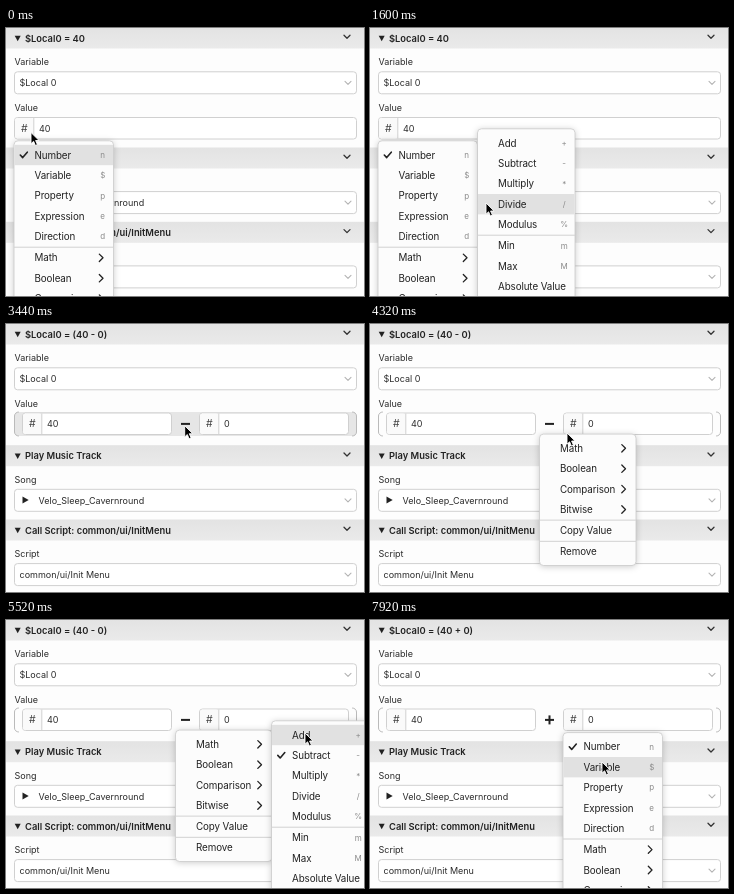
Recreate the animation shown at these times as an HTML page. Size 358 by 268 pixels, loop 8 s.

```html
<!DOCTYPE html>
<html lang="en">
<head>
<meta charset="utf-8">
<style>
  html, body { margin: 0; height: 100%; overflow: hidden; background: #fdfdfd; }
  svg { display: block; }
  text { font: 9px Inter, sans-serif; fill: #2b2b2b; white-space: pre; }
  .title { font-size: 9.35px; font-weight: 600; fill: #222; }
  .item { font-size: 9.8px; letter-spacing: -.1px; fill: #222; }
  .hint { font-size: 8px; fill: #8a8a8a; text-anchor: middle; }
  .hash { font-size: 10.5px; text-anchor: middle; fill: #444; }
  .line { fill: none; stroke-linecap: round; stroke-linejoin: round; }
  .menu { filter: drop-shadow(0 1px 3px #0003); }
</style>
</head>
<body>
<svg id="stage" width="358" height="268" viewBox="0 0 358 268"></svg>
<script>
const stage = document.getElementById('stage');
const LOOP = 8000, STEP = 80, ROW = 20.4, PAD = 4, GAP = 0.8;
const INK = '#222', BORDER = '#d0d0d0';

// Pointer stops: time, x, y
const stops = [
  [240, 25, 104.5], [880, 50, 226], [1360, 50, 226], [1600, 116, 175],
  [2080, 166, 132], [2640, 166, 132], [3520, 179, 101], [4080, 179, 101],
  [4320, 197, 109], [4560, 215, 122], [4800, 215, 122], [5520, 299, 113],
  [6000, 299, 113], [6720, 207, 107], [6800, 207, 107], [7040, 206, 105],
  [7440, 206, 105], [7920, 232, 142]
];

const valueItems = ['Number|n', 'Variable|$', 'Property|p', 'Expression|e', 'Direction|d', '-',
  'Math|>', 'Boolean|>', 'Comparison|>', 'Bitwise|>'];
const mathItems = ['Add|+', 'Subtract|-', 'Multiply|*', 'Divide|/', 'Modulus|%', '-',
  'Min|m', 'Max|M', 'Absolute Value|'];
const operatorItems = ['Math|>', 'Boolean|>', 'Comparison|>', 'Bitwise|>', '-',
  'Copy Value|', '-', 'Remove|'];

const menus = [
  { from: 0, to: 2400, x: 7.5, y: 112.8, w: 100.5, items: valueItems, checked: 0, focus: 0 },
  { from: 1040, to: 2400, x: 107, y: 100.8, w: 98.5, items: mathItems, checked: -1, focus: 0 },
  { from: 3680, to: 5840, x: 169, y: 110.1, w: 97.5, items: operatorItems, checked: -1, focus: -1 },
  { from: 4720, to: 5840, x: 265, y: 100.8, w: 98.5, items: mathItems, checked: 1, focus: 0 },
  { from: 7280, to: LOOP, x: 192.5, y: 112.6, w: 100.5, items: valueItems, checked: 0, focus: 0 }
];

for (const menu of menus) {
  let y = menu.y + PAD, index = 0;
  menu.rules = [];
  menu.rows = [];
  for (const item of menu.items) {
    if (item === '-') {
      menu.rules.push(y + GAP / 2);
      y += GAP;
    } else {
      const [label, hint] = item.split('|');
      menu.rows.push({ label, hint, y, index: index++ });
      y += ROW;
    }
  }
  menu.h = y + PAD - menu.y - .6;
}

function pointerAt(t) {
  const i = stops.findIndex(s => s[0] > t);
  if (i === 0) return stops[0].slice(1);
  if (i < 0) return stops[stops.length - 1].slice(1);
  const [t0, x0, y0] = stops[i - 1], [t1, x1, y1] = stops[i];
  const u = (t - t0) / (t1 - t0), k = u * u * (3 - 2 * u);
  return [x0 + (x1 - x0) * k, y0 + (y1 - y0) * k];
}

const text = (x, y, s, cls = '') => `<text x="${x}" y="${y}" class="${cls}">${s}</text>`;
const rect = (x, y, w, h, fill, extra = '') =>
  `<rect x="${x}" y="${y}" width="${w}" height="${h}" fill="${fill}" ${extra}/>`;
const line = (d, color, width) =>
  `<path class="line" d="${d}" stroke="${color}" stroke-width="${width}"/>`;
const box = (x, y, w, h) => rect(x, y, w, h, '#fff', `rx="3" stroke="${BORDER}"`);
const chevron = (x, y, color, width) => line(`M${x - 3} ${y - 1.5}l3 3 3-3`, color, width);

const headerFill = `<linearGradient id="bar" x2="0" y2="1">
  <stop stop-color="#e3e3e3"/><stop offset="1" stop-color="#eaeaea"/></linearGradient>`;

const header = (y, title) =>
  rect(0, y - 10.5, 358, 21, 'url(#bar)') +
  `<path d="M8.7 ${y - 2.2}h6l-3 5.4z" fill="${INK}"/>` +
  text(19, y + 3.7, title, 'title') + chevron(341, y - 1.2, '#333', 1.3);

const select = (y, x, value) =>
  box(8.5, y - 11, 342, 22) + text(x, y + 3.3, value) + chevron(342, y, '#b4b4b4', 1.1);

const numberField = (x, y, w, value) =>
  box(x, y, w, 21.5) +
  rect(x + .5, y + .5, 18.5, 20.5, '#fafafa', 'rx="2.5"') +
  rect(x + 18.8, y + .5, 1, 20.5, BORDER) +
  text(x + 9.9, y + 14.3, '#', 'hash') + text(x + 24.5, y + 14, value);

function valueGroup(plus, hover) {
  return (hover ? rect(8.5, 88, 342, 24, '#e6e6e6', 'rx="4"') : '') +
    line('M12.5 88a4 4 0 0 0-4 4v16a4 4 0 0 0 4 4', '#bababa', 1) +
    line('M346.5 88a4 4 0 0 1 4 4v16a4 4 0 0 1-4 4', '#bababa', 1) +
    numberField(16.5, 89, 149, '40') + numberField(193.5, 89, 149, '0') +
    rect(175, 98.9, 9, 2, INK) + (plus ? rect(178.5, 95.4, 2, 9, INK) : '');
}

function drawMenu(menu, active) {
  const { x, y, w, h } = menu;
  let out = rect(x + .5, y, w - 1, h, '#fcfcfc', 'rx="4" stroke="#cacaca" stroke-width=".8"');
  for (const row of menu.rows) {
    const mid = row.y + ROW / 2;
    if (row.index === active) out += rect(x + 1, row.y, w - 2, ROW, '#e1e1e1');
    if (row.index === menu.checked) out += line(`M${x + 6.8} ${mid}l2.4 2.6 4.6-5.4`, INK, 1.6);
    out += text(x + 21, mid + 3.5, row.label, 'item');
    out += row.hint === '>'
      ? line(`M${x + w - 14.7} ${mid - 3.7}l3.7 3.7-3.7 3.7`, INK, 1.3)
      : text(x + w - 11.3, mid + 2.8, row.hint, 'hint');
  }
  for (const ruleY of menu.rules) out += rect(x + .5, ruleY - .5, w - 1, 1, '#d2d2d2');
  return `<g class="menu">${out}</g>`;
}

const arrow = (x, y) =>
  `<path transform="translate(${x} ${y})" d="M0 0v11.2l2.6-2.4 1.8 4.2 2-.9-1.8-4.1h3.5z"
    fill="#000" stroke="#fff" stroke-width=".9" stroke-linejoin="round"/>`;

function moveCursor(x, y) {
  const arm = '<path d="M-.8-.8V-3.3H-2.4L0-6 2.4-3.3H.8V-.8z"';
  const arms = style => [0, 90, 180, 270].map(a => `${arm} transform="rotate(${a})" ${style}/>`).join('');
  return `<g transform="translate(${x} ${y})">` +
    arms('stroke="#fff" stroke-width="1.6" fill="#fff"') + arms('') +
    rect(-.9, -.9, 1.8, 1.8, '#000') + '</g>';
}

function render(t) {
  const [px, py] = pointerAt(t);
  const open = menus.filter(m => t >= m.from && t < m.to);
  const top = open[open.length - 1];
  const under = [...open].reverse().find(m =>
    px >= m.x && px < m.x + m.w && py >= m.y && py < m.y + m.h);

  const grouped = t >= 2400, plus = t >= 5840;
  const dy = grouped ? 0 : -1.7;
  const overGroup = grouped && !top && py > 87 && py < 115;
  const overHeader = grouped && !top && py > 121 && py < 142;
  const expression = grouped ? `(40 ${plus ? '+' : '-'} 0)` : '40';

  let out = headerFill + rect(0, 0, 358, 268, '#fdfdfd') +
    header(10, '$Local0 = ' + expression) +
    text(8.5, 37.3, 'Variable') + select(54.8, 13.5, '$Local 0') +
    text(8.5, 83, 'Value') +
    (grouped ? valueGroup(plus, overGroup) : numberField(8.5, 89.5, 342, '40'));

  out += `<g transform="translate(0 ${dy})">` +
    header(131.7, 'Play Music Track') +
    text(8.5, 159, 'Song') + select(176.3, 32.5, 'Velo_Sleep_Cavernround') +
    `<path d="M16.5 172.5v7l6.2-3.5z" fill="${INK}"/>` +
    header(206, 'Call Script: common/ui/InitMenu') +
    text(8.5, 233.2, 'Script') + select(250.6, 13.5, 'common/ui/Init Menu') + '</g>';

  if (overHeader) for (const y of [128.5, 131.5, 134.5]) out += rect(3.8, y - .6, 1.3, 1.3, '#777');

  for (const menu of open) {
    const row = menu === under && menu.rows.find(r => py >= r.y && py < r.y + ROW);
    out += drawMenu(menu, row ? row.index : menu === top && menu !== under ? menu.focus : -1);
  }
  stage.innerHTML = out + (overHeader ? moveCursor(px, py) : arrow(px, py));
}

let shown = -1;
function tick() {
  const t = Math.floor(performance.now() % LOOP / STEP) * STEP;
  if (t !== shown) render(shown = t);
  requestAnimationFrame(tick);
}
tick();
</script>
</body>
</html>
```
